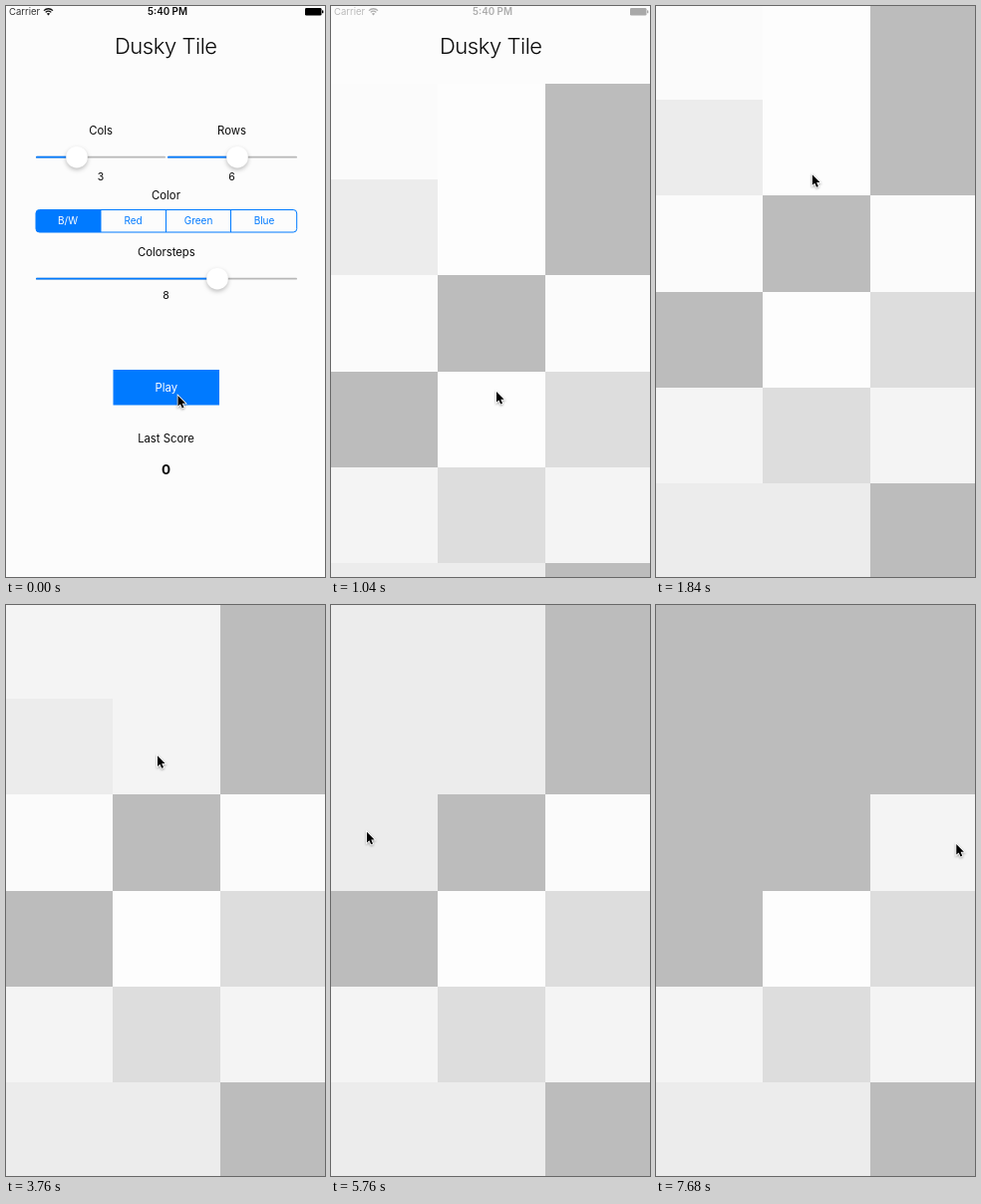
These frames come from a looping animation (320x573 px, 8000 ms). An HTML page:

```html
<!DOCTYPE html>
<html lang="en">
<head>
<meta charset="utf-8">
<title>Dusky Tile</title>
<style>
  html, body { margin: 0; height: 100%; overflow: hidden; background: #fcfcfc; }
  svg { display: block; width: 100vw; height: 100vh; }
  text { font: 11.3px Inter, "Liberation Sans", sans-serif; text-anchor: middle; fill: #0a0a0a; }
  .title { font-size: 22px; font-weight: 300; letter-spacing: -.45px; }
  .value { font-size: 10.5px; }
  .score { font-size: 13.5px; font-weight: 700; }
  .segment text { font-size: 10px; fill: #007aff; }
  .segment .on, #play { fill: #fff; }
  .carrier { font-size: 9.5px; text-anchor: start; fill: #333; }
  .clock { font-size: 9.8px; font-weight: 600; }
  .blue { fill: #007aff; }
  .line { fill: none; stroke: #007aff; }
  .thumb { fill: #fff; filter: drop-shadow(0 2px 2px rgba(0, 0, 0, .25)); }
  #grid { shape-rendering: crispEdges; }
  #cursor { stroke: #fff; stroke-width: 1.6; paint-order: stroke; filter: drop-shadow(0 1px 1px rgba(0, 0, 0, .35)); }
</style>
</head>
<body>
<svg viewBox="0 0 320 573">
  <rect width="320" height="573" fill="#fcfcfc"/>
  <text class="title" x="160.3" y="47.5">Dusky Tile</text>
  <text x="95" y="129">Cols</text>
  <text x="226.5" y="129">Rows</text>
  <g id="sliders"></g>
  <text class="value" x="95" y="174.5">3</text>
  <text class="value" x="226.5" y="174.5">6</text>
  <text x="160.5" y="194">Color</text>
  <g class="segment">
    <path class="blue" d="M95 204.5H33.5a3.5 3.5 0 0 0-3.5 3.5v15.5a3.5 3.5 0 0 0 3.5 3.5H95z"/>
    <rect class="line" x="30" y="204.5" width="261.7" height="22.5" rx="3.5"/>
    <path class="line" d="M95 204.5v22.5M160.5 204.5v22.5M225.5 204.5v22.5"/>
    <text class="on" x="62" y="219.3">B/W</text>
    <text x="127.5" y="219.3">Red</text>
    <text x="193" y="219.3">Green</text>
    <text x="259" y="219.3">Blue</text>
  </g>
  <text x="160.8" y="251">Colorsteps</text>
  <text class="value" x="160.5" y="294">8</text>
  <rect class="blue" x="107.5" y="365" width="106.5" height="35.5"/>
  <text id="play" x="160.8" y="387">Play</text>
  <text x="160.5" y="438">Last Score</text>
  <text class="score" x="160.5" y="470">0</text>
  <g id="grid"></g>
  <g id="status">
    <text class="carrier" x="3" y="9.2">Carrier</text>
    <g fill="none" stroke="#111" stroke-width="1.3">
      <path d="M38 4.6a6.4 6.4 0 0 1 9 0M39.7 6.4a4 4 0 0 1 5.6 0"/>
    </g>
    <path d="M42.5 9.4l-1.6-1.7a2.3 2.3 0 0 1 3.2 0z" fill="#111"/>
    <text class="clock" x="162" y="9.2">5:40 PM</text>
    <rect x="300" y="2" width="16.5" height="7.5" rx="1.3"/>
    <rect x="317" y="4.3" width="1.4" height="3" rx=".6"/>
  </g>
  <path id="cursor" d="M0 0V10.6L2.4 8.4L4.2 12.5L6 11.7L4.3 7.7H7.6Z"/>
</svg>
<script>
const $ = id => document.getElementById(id);
const LOOP = 8000, TICK = 80;
const clamp = v => Math.min(1, Math.max(0, v));

function add(parent, tag, attrs) {
  const el = document.createElementNS('http://www.w3.org/2000/svg', tag);
  for (const k in attrs) el.setAttribute(k, attrs[k]);
  return parent.appendChild(el);
}

function slider(x, end, thumb, y) {
  const bar = (from, to, fill) =>
    add($('sliders'), 'rect', { x: from, y: y - .9, width: to - from, height: 1.8, rx: .9, fill });
  bar(x, end, '#b7b7b7');
  bar(x, thumb, '#007aff');
  add($('sliders'), 'circle', { class: 'thumb', cx: thumb, cy: y, r: 10.8 });
}
slider(30, 160, 71, 151.7);
slider(162, 292, 232, 151.7);
slider(30, 292, 212, 273.7);

// Grid: a tap darkens the connected area of equal shade by one step.
const COLS = 3, ROWS = 6, TOP = -2;
const shades = ['#fdfdfd', '#fbfbfb', '#f4f4f4', '#ececec', '#dddddd', '#bcbcbc'];
const start = [...'105305151504242335'].map(Number);
const taps = [[3280, 1, 1], [3760, 1, 1], [4240, 1, 1], [5120, 0, 2],
              [5600, 0, 2], [6080, 0, 2], [6560, 0, 2], [7680, 2, 2]];

const edgeX = c => Math.round(107.6 * c - .5);
const edgeY = r => Math.round(96.2 * r);
const cells = start.map((_, i) => {
  const c = i % COLS, r = Math.floor(i / COLS);
  return add($('grid'), 'rect', {
    x: edgeX(c), y: edgeY(r),
    width: edgeX(c + 1) - edgeX(c), height: edgeY(r + 1) - edgeY(r)
  });
});

function darken(levels, c, r, from) {
  const i = r * COLS + c;
  if (c < 0 || r < 0 || c >= COLS || r >= ROWS || levels[i] !== from) return;
  levels[i]++;
  darken(levels, c - 1, r, from);
  darken(levels, c + 1, r, from);
  darken(levels, c, r - 1, from);
  darken(levels, c, r + 1, from);
}

function levelsAt(t) {
  const levels = [...start];
  for (const [when, c, r] of taps)
    if (t >= when) darken(levels, c, r, levels[r * COLS + c]);
  return levels;
}

// Critically damped slide from below the screen.
function gridTop(t) {
  const x = Math.max(0, t - 902) * .0252;
  return TOP + Math.round(575 * (1 + x) * Math.exp(-x));
}

// Cursor moves: begin, end, then four Bezier points.
const line = (t0, t1, a, b) => [t0, t1, a, a, b, b];
const moves = [
  line(160, 400, [172.5, 391], [166, 387]),
  [1520, 1920, [166, 387], [180, 340], [168, 200], [152, 151.3]],
  [4480, 4880, [152, 151.3], [270, 240], [220, 236], [19, 236]],
  line(5200, 5280, [19, 236], [18.5, 236]),
  line(5520, 5760, [18.5, 236], [36, 227.8]),
  line(6160, 6400, [36, 227.8], [42, 229.2]),
  [6720, 7520, [42, 229.2], [90, 396], [270, 396], [301.3, 240]]
];

function cursorAt(t) {
  const [t0, t1, a, b, c, d] = moves.filter(m => t >= m[0]).pop() || moves[0];
  const p = clamp((t - t0) / (t1 - t0)), s = p * p * (3 - 2 * p), q = 1 - s;
  return a.map((v, i) =>
    v * q ** 3 + 3 * b[i] * s * q * q + 3 * c[i] * s * s * q + d[i] * s ** 3);
}

function draw(t) {
  $('play').style.opacity = t < 800 ? 1 : .3;
  $('status').style.opacity = clamp(.6 - (t - 960) * .0034);
  $('grid').setAttribute('transform', `translate(0 ${gridTop(t)})`);
  levelsAt(t).forEach((level, i) => cells[i].setAttribute('fill', shades[level]));
  $('cursor').setAttribute('transform', `translate(${cursorAt(t)})`);
}

const origin = performance.now();
function frame() {
  const t = (performance.now() - origin) % LOOP;
  draw(Math.floor(t / TICK) * TICK);
  requestAnimationFrame(frame);
}
frame();
</script>
</body>
</html>
```
